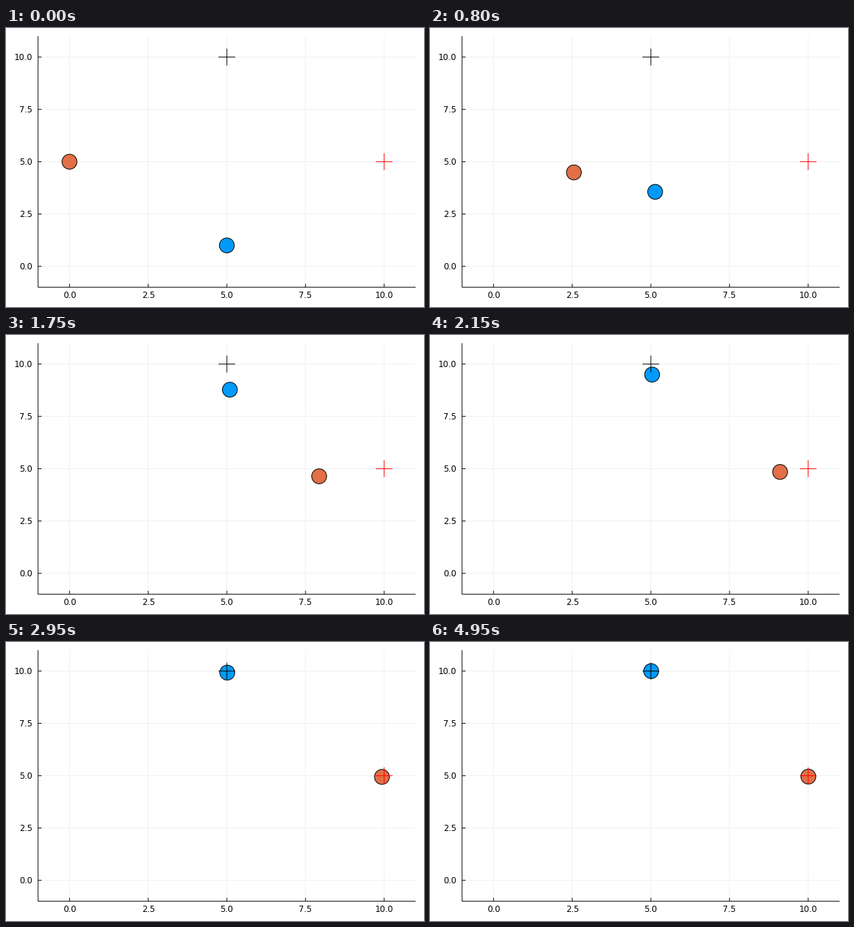
Write a matplotlib script that moves like this. It is 600 by 400 pixels and loops after 5 s.

```python
import math
import matplotlib.pyplot as plt
from matplotlib.animation import FuncAnimation
from matplotlib.patches import Circle

WIDTH, HEIGHT, DPI = 600, 400, 100
FRAMES, INTERVAL = 100, 50
DT = 0.1  # simulated seconds per step
PX = 72 / DPI  # one pixel in points
LEFT, RIGHT, TOP, BOTTOM = 46, 588, 11.7, 371.7
TICKS = (0, 2.5, 5, 7.5, 10)


def travel(t, distance, cruise_at, brake_at, decay, omega):
    """Accelerate evenly, cruise, then settle as a damped oscillator."""
    if t < cruise_at:
        return t * t
    speed = 2 * cruise_at
    cruised = cruise_at ** 2 + speed * (min(t, brake_at) - cruise_at)
    if t < brake_at:
        return cruised
    left, tau = distance - cruised, t - brake_at
    swing = (decay * left - speed) / omega
    return distance - math.exp(-decay * tau) * (
        left * math.cos(omega * tau) + swing * math.sin(omega * tau))


def dodge(t, peak=2.2):
    """Sideways swerve: quick onset, slower return."""
    if t < peak:
        return math.exp(-0.5 * ((t - peak) / 0.52) ** 2)
    return 1 / math.cosh((t - peak) / 0.75)


def positions(t):
    drift = min(t / 5, 1)
    blue_at = (5 + 0.26 * dodge(t) + 0.01 * drift,
               1 + travel(t, 9, 1.8, 1.8, 1.4, 0.1))
    orange_at = (travel(t, 10, 1.53, 2.7, 0.9, 0.49),
                 5 - 0.97 * dodge(t) - 0.043 * drift)
    return blue_at, orange_at


def to_px(x, y):
    return (LEFT + (x + 1) * (RIGHT - LEFT) / 12,
            BOTTOM - (y + 1) * (BOTTOM - TOP) / 12)


fig = plt.figure(figsize=(WIDTH / DPI, HEIGHT / DPI), dpi=DPI, facecolor="white")
ax = fig.add_axes([0, 0, 1, 1])
ax.set_xlim(0, WIDTH)
ax.set_ylim(HEIGHT, 0)
ax.axis("off")


def line(x0, y0, x1, y1, color="black", z=2):
    ax.plot([x0, x1], [y0, y1], color=color, lw=PX, zorder=z,
            solid_capstyle="butt", snap=False)


def label(x, y, value, align):
    ax.text(x, y, f"{value:.1f}", ha=align, va="baseline",
            family="DejaVu Sans", size=12 * PX, color="black")


def cross(x, y, color):
    cx, cy = to_px(x, y)
    line(cx - 12, cy, cx + 12, cy, color, 4)
    line(cx, cy - 12, cx, cy + 12, color, 4)


def ball(color):
    return ax.add_patch(Circle((0, 0), 10.7, facecolor=color,
                               edgecolor="black", lw=PX, zorder=3))


for tick in TICKS:
    tx, ty = to_px(tick, tick)
    line(tx, TOP, tx, BOTTOM, "#f0f0f0", 0)
    line(LEFT, ty, RIGHT, ty, "#f0f0f0", 0)
    line(tx, BOTTOM - 5, tx, BOTTOM)
    line(LEFT, ty, LEFT + 5, ty)
    label(tx, 387, tick, "center")
    label(38, ty + 4, tick, "right")

line(LEFT, TOP, LEFT, BOTTOM)
line(LEFT, BOTTOM, RIGHT, BOTTOM)
cross(5, 10, "black")
cross(10, 5, "red")
blue, orange = ball("#009afa"), ball("#e26f46")


def update(step):
    blue_at, orange_at = positions(step * DT)
    blue.center = to_px(*blue_at)
    orange.center = to_px(*orange_at)
    return blue, orange


anim = FuncAnimation(fig, update, frames=FRAMES, interval=INTERVAL,
                     init_func=lambda: update(0), repeat=True, repeat_delay=0)
plt.show()
```
